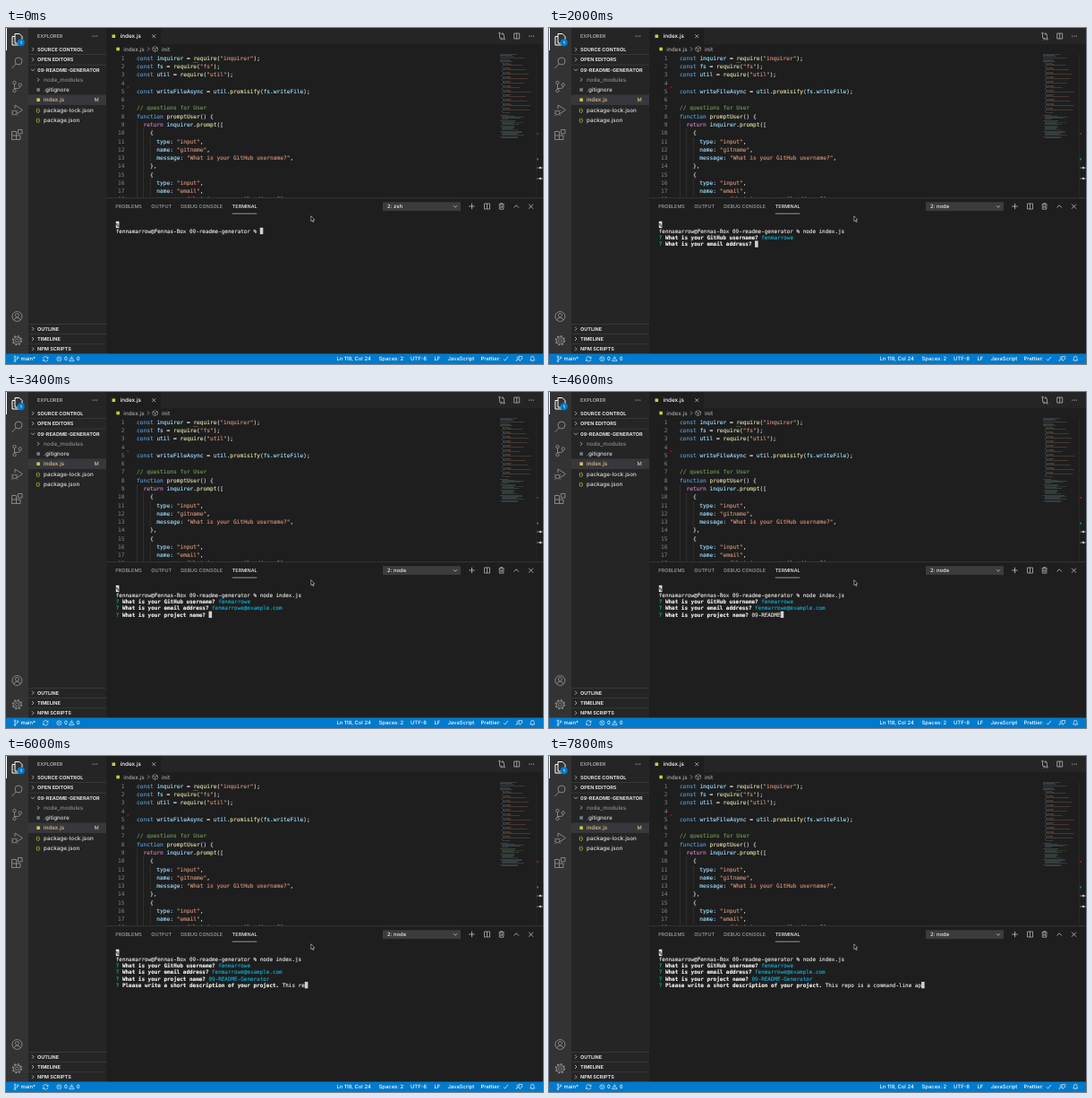
An HTML page that plays this animation: 600x375 px, repeating every 8 s.

```html
<!DOCTYPE html>
<html lang="en">
<head>
<meta charset="utf-8">
<title>Terminal prompt in an editor</title>
<style>
  html, body { margin: 0; width: 100%; height: 100%; overflow: hidden; background: #1e1e1e; }
  svg { display: block; width: 100%; height: 100%; font-weight: 500; }
  text { font-family: Inter, "Open Sans", sans-serif; white-space: pre; text-rendering: geometricPrecision; }
  .mono { font-family: "DejaVu Sans Mono", monospace; }
  tspan { stroke-width: 0.14px; }
</style>
</head>
<body>
<svg id="stage" viewBox="0 0 600 375"></svg>
<script>
const stage = document.getElementById("stage");
const LOOP = 8000, TICK = 200;

const escapeText = s => s.replace(/&/g, "&amp;").replace(/</g, "&lt;");
const rect = (x, y, w, h, fill, more = "") =>
  `<rect x="${x}" y="${y}" width="${w}" height="${h}" fill="${fill}" ${more}/>`;
const line = (d, color = "#c5c5c5", width = 0.7, fill = "none") =>
  `<path d="${d}" stroke="${color}" stroke-width="${width}" fill="${fill}"/>`;
const circle = (x, y, r, color, width = 0.7) =>
  `<circle cx="${x}" cy="${y}" r="${r}" fill="none" stroke="${color}" stroke-width="${width}"/>`;
// Text is placed by the vertical middle of its capitals.
const textTag = (x, mid, size, fill, body, more = "") =>
  `<text x="${x}" y="${mid + size * 0.36}" font-size="${size}" fill="${fill}" ${more}>${body}</text>`;
const label = (x, mid, size, fill, str, more) => textTag(x, mid, size, fill, escapeText(str), more);
// A hairline stroke gives the heavier look of smoothed type.
const span = (str, color, weight = 400) =>
  `<tspan fill="${color}" stroke="${color}" font-weight="${weight}">${escapeText(str)}</tspan>`;
const chevron = (x, y, down, color = "#cccccc") =>
  line(down ? `M${x - 2} ${y - 1}l2 2 2-2` : `M${x - 1} ${y - 2}l2 2-2 2`, color, 0.75);
const split = (x, y) => line(`M${x - 3} ${y - 3}h6v6h-6zM${x} ${y - 3}v6`);
const fileMark = (x, mid, color) => rect(x, mid - 1.8, 3.6, 3.6, color);

function activityBar() {
  const dim = "#858585", w = 1;
  return rect(0, 0, 25, 364, "#333333") + rect(0, 0, 1, 25, "#ffffff") +
    line("M10 8.500V6.500h5l3 3v7.500h-8zM10 9.500H7v9.500h7v-2", "#ffffff", w) +
    `<circle cx="16.700" cy="16.300" r="4.100" fill="#007acc"/>` +
    label(16.7, 16.3, 4.6, "#ffffff", "1", 'text-anchor="middle" font-weight="600"') +
    circle(14, 37, 4, dim, w) + line("M11.200 40l-4.700 5", dim, w) +
    circle(9.5, 61, 1.7, dim, w) + circle(9.5, 70, 1.7, dim, w) + circle(15.8, 63.5, 1.7, dim, w) +
    line("M9.500 62.700v5.600M15.800 65.200q0 2.300-3 2.300h-3", dim, w) +
    line("M10 90v-4l8.500 5.500-6 4", dim, w) + circle(9.5, 94.5, 2.3, dim, w) +
    line("M5.700 92l2 1M5.500 95h1.700M5.800 98l2-1.500M13.300 92l-2 1M11.800 95h2M13.300 98l-2-1.500", dim, 0.7) +
    line("M6.500 115.500h5v9h-5zM6.500 120h9.500v4.500h-9.500M13.500 113.500h4.500v4.500h-4.500z", dim, w) +
    circle(12.4, 322, 5.5, dim, w) + circle(12.4, 320.5, 2, dim, w) +
    line("M8.700 326q.7-2.800 3.700-2.800t3.700 2.800", dim, w) +
    circle(12.4, 348.8, 1.8, dim, w) + circle(12.4, 348.8, 4, dim, w) +
    `<circle cx="12.400" cy="348.800" r="5" fill="none" stroke="${dim}" stroke-width="1.600" stroke-dasharray="1.960 1.960"/>`;
}

function sideBar() {
  const section = (mid, name, open) =>
    chevron(30, mid, open) + label(35, mid, 5.5, "#dddddd", name, 'font-weight="700"');
  const border = y => rect(25, y, 87, 0.5, "#464647");
  const file = (mid, name, fill) => label(42, mid, 6.3, fill, name);
  const braces = mid => label(33.2, mid, 5.6, "#cbcb41", "{}", 'font-weight="600"');
  return rect(25, 0, 87, 364, "#252526") + rect(25, 74.5, 87, 11.4, "#37373d") +
    label(35, 9.2, 5.5, "#bbbbbb", "EXPLORER") +
    [96.5, 98.8, 101.1].map(x => rect(x, 8.6, 1, 1, "#c5c5c5")).join("") +
    [29.3, 40.8, 330, 341.3, 352.6].map(border).join("") +
    section(23.8, "SOURCE CONTROL") + section(35.2, "OPEN EDITORS") +
    section(46.7, "09-README-GENERATOR", true) +
    chevron(36, 57.8) + file(57.8, "node_modules", "#8c8c8c") +
    fileMark(34.3, 69, "#6d8086") + file(69, ".gitignore", "#dddddd") +
    fileMark(34.3, 80.2, "#cbcb41") + file(80.2, "index.js", "#e2c08d") +
    label(98.5, 80.2, 5.7, "#e2c08d", "M") +
    braces(91.5) + file(91.5, "package-lock.json", "#dddddd") +
    braces(102.9) + file(102.9, "package.json", "#dddddd") +
    section(335.7, "OUTLINE") + section(347, "TIMELINE") + section(358.3, "NPM SCRIPTS");
}

const source = `const inquirer = require("inquirer");
const fs = require("fs");
const util = require("util");

const writeFileAsync = util.promisify(fs.writeFile);

// questions for User
function promptUser() {
  return inquirer.prompt([
    {
      type: "input",
      name: "gitname",
      message: "What is your GitHub username?",
    },
    {
      type: "input",
      name: "email",
      message: "What is your email address?",`.split("\n");

function highlight(code) {
  const token = /(\/\/.*)|("[^"]*")|\b(const|function)\b|\b(return)\b|(\w+)(?=\()|(\w+:?)|([^\w"/]+)/g;
  const colors = ["#6a9955", "#ce9178", "#569cd6", "#c586c0", "#dcdcaa", "#9cdcfe", "#d4d4d4"];
  return [...code.matchAll(token)]
    .map(m => span(m[0], colors[m.slice(1).findIndex(g => g !== undefined)])).join("");
}

function minimap() {
  let seed = 7, out = "";
  const random = () => (seed = seed * 16807 % 2147483647) / 2147483647;
  const bar = (x, row, w, fill) => { out += rect(552 + x, 29 + row, w, 0.6, fill, 'opacity="0.38"'); };
  source.slice(0, 9).forEach((code, i) => {
    if (code) bar(0, i, code.length * 0.52, i === 6 ? "#6a9955" : "#8ca9b8");
  });
  for (let row = 9; row < 66; row++) {
    const part = (row - 9) % 5;
    if (part === 0 || part === 4) bar(2, row, 1, "#b0b0b0");
    else {
      bar(3, row, part === 3 ? 4 : 2.5, "#8ab4cb");
      bar(part === 3 ? 8 : 6, row, part === 3 ? 13 + random() * 15 : 4 + random() * 3, "#ce9178");
    }
  }
  for (let row = 67; row < 94; row++) {
    if (row % 6 === 1) continue;
    bar(row % 6 === 2 ? 0 : 2, row, 6 + random() * 20, random() < 0.25 ? "#6a9955" : "#8ca9b8");
  }
  return out;
}

function editor() {
  const grey = "#a9a9a9", size = 6.19, pitch = 9.27, cell = size * 0.602;
  const lines = source.map((code, i) => {
    const mid = 33.6 + i * pitch;
    let guides = "";
    for (let column = 0; column < code.search(/\S/); column += 2)
      guides += rect(146 + column * cell, mid - pitch / 2, 0.5, pitch, "#404040");
    return guides + label(132.5, mid, size, "#858585", String(i + 1), 'class="mono" text-anchor="end"') +
      textTag(146, mid, size, "#d4d4d4", highlight(code), 'class="mono"');
  }).join("");
  return rect(112, 0, 488, 190, "#1e1e1e") + rect(173, 0, 427, 18, "#252526") +
    fileMark(118.5, 9.2, "#cbcb41") + label(127.7, 9.2, 6.3, "#ffffff", "index.js") +
    line("M163.200 7.200l4 4m0-4l-4 4", "#cccccc") +
    line("M551.500 6.500v4q0 1.500 1.500 1.500h1.500m-1.500-1.500l1.500 1.500-1.500 1.500M556.500 11.500v-3q0-2-1.500-2h-1m1.300-1.300l-1.300 1.300 1.300 1.300") +
    circle(551.5, 5.8, 0.8, "#c5c5c5") + circle(556.5, 12.3, 0.8, "#c5c5c5") +
    split(570.7, 9) + [584.2, 586.5, 588.8].map(x => rect(x, 8.6, 1, 1, "#c5c5c5")).join("") +
    fileMark(123.3, 23.5, "#cbcb41") + label(131.3, 23.5, 6.3, grey, "index.js") +
    chevron(159, 23.5, false, grey) +
    line("M163.800 22l2.800-1.500 2.800 1.500v3l-2.800 1.500-2.800-1.500zl2.800 1.500 2.800-1.500M166.600 23.500v3", "#c5c5c5", 0.5) +
    label(174, 23.5, 6.3, grey, "init") +
    `<clipPath id="codeArea"><rect x="112" y="28" width="488" height="161.500"/></clipPath>` +
    `<g clip-path="url(#codeArea)">${lines}</g>` +
    [209.5, 211.3, 213.1].map(x => rect(x, 38, 0.8, 0.8, "#a0a0a0")).join("") +
    `<path d="M135.500 64.500l2.200 1.600-2.200 1.600z" fill="#94151b"/>` + minimap() +
    rect(592.6, 29, 0.4, 160, "#333333") +
    rect(593, 117, 2, 2, "#94151b") + rect(593, 145.5, 2, 2, "#0c7d9d") +
    [156, 168].map(y => rect(593, y - 0.4, 7, 0.9, "#808080") +
      `<circle cx="597" cy="${y}" r="1.300" fill="#c0c0c0"/>`).join("");
}

function panel() {
  const tabs = [[122.3, "PROBLEMS"], [162.3, "OUTPUT"], [195.3, "DEBUG CONSOLE"], [252.8, "TERMINAL"]];
  return rect(112, 189.5, 488, 174.5, "#1e1e1e") + rect(112, 189.5, 488, 0.6, "#434343") +
    tabs.map(([x, name], i) => label(x, 199.4, 5.45, i === 3 ? "#f0f0f0" : "#a0a0a0", name)).join("") +
    rect(252.8, 206.8, 27.5, 0.6, "#e7e7e7") +
    rect(421, 194.3, 87, 9.8, "#3c3c3c") + `<g id="shell"></g>` + chevron(502, 199.2, true) +
    line("M517.300 199h6.400m-3.200-3.200v6.400", "#c5c5c5", 0.8) + split(537.5, 199) +
    line("M550.600 196.800h6m-4 0v-1.200h2v1.200m-3.300 0v5.400h4.600v-5.400m-3 1.400v2.800m1.400-2.800v2.800") +
    line("M567.500 200.500l2.700-2.700 2.700 2.700", "#c5c5c5", 0.8) +
    line("M584 196.700l5 5m0-5l-5 5", "#c5c5c5", 0.8);
}

function statusBar() {
  const white = "#ffffff";
  const items = [[16.5, "main*"], [65, "0"], [78.8, "0"], [369.5, "Ln 118, Col 24"], [416.5, "Spaces: 2"],
    [452, "UTF-8"], [478.5, "LF"], [493.5, "JavaScript"], [530.5, "Prettier:"]];
  return rect(0, 363.5, 600, 11.5, "#007acc") +
    items.map(([x, str]) => label(x, 369.3, 5.85, white, str)).join("") +
    circle(10, 366.9, 0.9, white, 0.6) + circle(10, 371.7, 0.9, white, 0.6) + circle(13.2, 367.7, 0.9, white, 0.6) +
    line("M10 367.800v3m3.200-2.200q0 1.300-3.200 1.500", white, 0.6) +
    line("M41.600 369a2.600 2.600 0 0 1 5-.8m.3 1.500a2.600 2.600 0 0 1-5 .8M45.300 368.500h1.700v-1.700M43.200 370.200h-1.700v1.700", white, 0.6) +
    circle(59.3, 369.3, 2.5, white, 0.6) + line("M58.300 368.300l2 2m0-2l-2 2", white, 0.6) +
    line("M73.300 366.700l2.800 5h-5.600zM73.300 368.500v1.500m0 .5v.6", white, 0.6) +
    line("M556 369.500l1.500 1.700 3.300-4.200", white, 0.7) +
    circle(572.3, 368.2, 1.2, white, 0.6) +
    line("M570.200 372v-1.500q2-1 4.200 0v1.500M573 366.500h3.700v3h-1l-1 1", white, 0.6) +
    line("M585.600 371h5.200l-.8-1.200v-1.500a1.800 1.900 0 0 0-3.600 0v1.500zM587.500 371.500q.700 1 1.400 0", white, 0.6);
}

const pointer = `<path d="M340.800 209.800v5.800l1.300-1.200 1 2.200.9-.4-1-2.100h1.800z" fill="#000000" stroke="#ffffff" stroke-width="0.500"/>`;

stage.innerHTML = rect(0, 0, 600, 375, "#1e1e1e") + activityBar() + sideBar() + editor() + panel() +
  statusBar() + `<g id="terminal"></g>` + pointer;

// Each entry is typed along its keys [time, letters] and confirmed at "enter".
const prompts = [
  { ask: "fennamarrow@Fennas-Box 09-readme-generator %", answer: "node index.js", keys: [[0, 0], [800, 13]], enter: 1000 },
  { ask: "What is your GitHub username?", answer: "fenmarrowe", keys: [[1000, 0], [1800, 10]], enter: 2000 },
  { ask: "What is your email address?", answer: "fenmarrowe@example.com", keys: [[2000, 0], [3200, 22]], enter: 3400 },
  { ask: "What is your project name?", answer: "09-README-Generator", keys: [[3400, 0], [4600, 9], [5200, 19]], enter: 5400 },
  { ask: "Please write a short description of your project.", answer: "This repo is a command-line ap",
    keys: [[5400, 0], [6800, 17], [7800, 30]], enter: LOOP }
];

function lettersAt(keys, time) {
  for (let i = 1; i < keys.length; i++) {
    const [t0, n0] = keys[i - 1], [t1, n1] = keys[i];
    if (time <= t1) return Math.round(n0 + (n1 - n0) * (time - t0) / (t1 - t0));
  }
  return keys[keys.length - 1][1];
}

const terminal = document.getElementById("terminal");
const shell = document.getElementById("shell");
const ROW = 7.3, LEFT = 122.8, SIZE = 5.94, CELL = SIZE * 0.602, PLAIN = "#e0e0e0";

function draw(time) {
  let out = rect(LEFT, 215.8, CELL, ROW, "#e5e5e5") +
    label(LEFT, 219.4, SIZE, "#1e1e1e", "%", 'class="mono" font-weight="700"');
  prompts.forEach(({ ask, answer, keys, enter }, i) => {
    if (time < keys[0][0]) return;
    const mid = 219.2 + ROW * (i + 1), done = time >= enter;
    const typed = answer.slice(0, lettersAt(keys, time));
    const question = i ? span("? ", "#0dbc79") + span(ask + " ", "#f0f0f0", 700) : span(ask + " ", PLAIN);
    out += textTag(LEFT, mid, SIZE, PLAIN,
      question + span(typed, i && done ? "#11a8cd" : PLAIN), 'class="mono"');
    const column = (i ? 2 : 0) + ask.length + 1 + typed.length;
    if (!done) out += rect(LEFT + column * CELL, mid - ROW / 2, CELL, ROW, "#d0d0d0");
  });
  terminal.innerHTML = out;
  shell.innerHTML = label(426, 199.2, 5.9, "#f0f0f0", time < prompts[0].enter ? "2: zsh" : "2: node");
}

const start = performance.now();
let shown = -1;
function frame() {
  const time = Math.floor((performance.now() - start) % LOOP / TICK) * TICK;
  if (time !== shown) draw(shown = time);
  requestAnimationFrame(frame);
}
frame();
</script>
</body>
</html>
```
